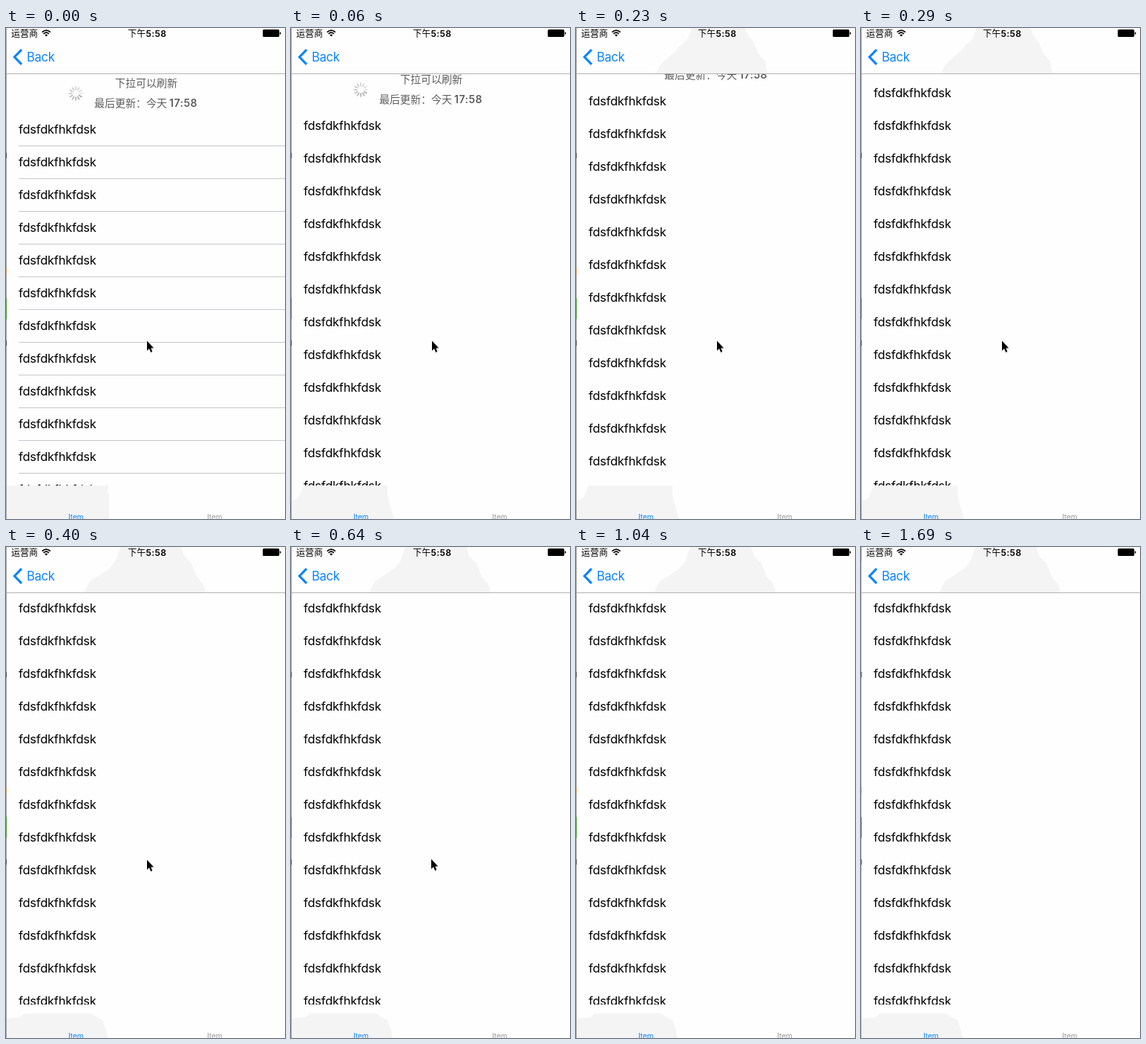
An HTML page for the animation above (1.74 s loop, 376x660 px).

```html
<!DOCTYPE html>
<html lang="zh">
<head>
<meta charset="utf-8">
<title>Pull to refresh</title>
<style>
html, body { margin: 0; width: 100%; height: 100%; overflow: hidden; background: #fefefe; }
svg { display: block; width: 376px; height: 660px; font-family: Inter, "Noto Sans CJK SC", "Noto Sans CJK", sans-serif; }
.row { font-size: 16.4px; letter-spacing: -.18px; }
.hint { font-size: 14px; font-weight: 500; fill: #5c5c5c; }
.num { font-weight: 600; letter-spacing: .5px; }
.status { font-size: 12px; }
.clock { font-weight: 600; letter-spacing: .45px; }
.nav { font-size: 16.6px; letter-spacing: -.3px; fill: #0b84ff; }
.tab { font-size: 10px; }
.shade path { fill: #f4f4f4; }
</style>
</head>
<body>
<svg viewBox="0 0 376 660">
  <defs><clipPath id="view"><path d="M0 62H376V615H0z"/></clipPath></defs>
  <rect width="376" height="660" fill="#fefefe"/>
  <g class="shade" id="shade"></g>

  <g clip-path="url(#view)">
    <g id="list">
      <g id="spinner" transform="translate(94 88)" stroke-width="1.7" stroke-linecap="round"></g>
      <text class="hint" x="147" y="79.3">下拉可以刷新</text>
      <text class="hint" x="119" y="106.3">最后更新：今天</text>
      <text class="hint num" x="220" y="106">17:58</text>
      <g id="rows"></g>
    </g>
    <g id="lines" fill="#c8c7cc"></g>
  </g>

  <path d="M0 61H376V62H0z" fill="#b4b4b4"/>
  <text class="status" x="7" y="11.6">运营商</text>
  <g fill="none" stroke="#000" stroke-width="1.7">
    <path d="M48.6 5.6Q54.2 .6 59.8 5.6M50.6 7.8Q54.2 4.5 57.8 7.8"/>
    <path d="M54.2 11.4L52.2 9.3Q54.2 7.8 56.2 9.3z" fill="#000" stroke="none"/>
  </g>
  <text class="status" x="164.3" y="11.6" font-weight="500">下午</text>
  <text class="status clock" x="188.4" y="11.5">5:58</text>
  <rect x="346" y="2" width="22.3" height="10" rx="1.6"/>
  <path d="M369 5.2Q370.6 5.6 370.6 7T369 8.8z"/>

  <path d="M21 29.2L11.4 39L21 48.8" fill="none" stroke="#0b84ff" stroke-width="3.1"/>
  <text class="nav" x="28" y="45">Back</text>
  <text class="tab" x="84" y="661" fill="#0b84ff">Item</text>
  <text class="tab" x="271" y="661" fill="#999">Item</text>

  <g id="edge">
    <path d="M0 0H1V660H0z" fill="#a6a6a6"/>
    <path d="M0 168H1V175H0zM0 420H1V427H0z" fill="#555"/>
    <path d="M0 323H1V331H0z" fill="#d69a60"/>
    <path d="M0 363H1V391H0z" fill="#4c9a35"/>
  </g>
  <path id="edgeLight" d="M0 19H1V168H0zM0 175H1V323H0zM0 331H1V363H0zM0 391H1V420H0zM0 427H1V660H0z" fill="#c6c6c6"/>

  <path id="cursor" d="M0 0V13.2L3 10.5L5.1 15.4L7.3 14.4L5.2 9.7H9.2z" fill="#000" stroke="#fff" stroke-width="1.6" paint-order="stroke"/>
</svg>
<script>
const LOOP = 1740;
const $ = id => document.getElementById(id);

function add(parent, tag, attrs, text = '') {
  const el = document.createElementNS('http://www.w3.org/2000/svg', tag);
  for (const k in attrs) el.setAttribute(k, attrs[k]);
  el.textContent = text;
  return parent.appendChild(el);
}

// steps: [time, value] pairs, each value held until the next time
function hold(el, prop, steps) {
  const frames = steps.map(([t, v]) => ({ offset: t / LOOP, [prop]: v, easing: 'steps(1, end)' }));
  frames.push({ offset: 1, [prop]: steps[steps.length - 1][1] });
  el.animate(frames, { duration: LOOP, iterations: Infinity });
}

const move = (x, y) => `translate(${x}px, ${y}px)`;
const show = (el, from, to) => hold(el, 'opacity',
  [...(from > 0 ? [[0, 0]] : []), [from, 1], ...(to < LOOP ? [[to, 0]] : [])]);

for (let i = 0; i < 13; i++) {
  add($('rows'), 'text', { class: 'row', x: 17, y: 142 + 44 * i }, 'fdsfdkfhkfdsk');
  if (i < 11) add($('lines'), 'rect', { x: 17, y: 158 + 44 * i, width: 359, height: 1 });
}

for (let i = 0; i < 12; i++) {
  const gray = 170 + ((i + 8) % 12) * 5;
  add($('spinner'), 'path', {
    d: 'M0 -5.2V-9', transform: `rotate(${i * 30})`, stroke: `rgb(${gray},${gray},${gray})`
  });
}

// scroll back under the bar
hold($('list'), 'transform', [
  [0, 0], [60, -5], [120, -14], [170, -25], [230, -38], [290, -49], [340, -53], [400, -54]
].map(([t, y]) => [t, move(0, y)]));
show($('lines'), 0, 60);

// pale patches on the bars
const wedge = 'M0 660V636L10 632L17 615H130V627L133 640L139 660z';
[
  [0, 60, 'M0 615H139L137 622L139 627V660H0z'],
  [60, 120, wedge],
  [120, 230, 'M0 615H128L127 625L131 631V660H0z'],
  [170, 230, 'M148 61L150 50L155 42L165 36L183 31L200 27L217 28L232 34L239 44L241 61z'],
  [230, 340, wedge],
  [230, 340, 'M107 61L115 48L130 35L142 22L150 15L156 0H228L232 10L240 20L246 35L255 45L258 61z'],
  [340, LOOP, 'M0 660V634L20 632L25 627H115L122 632L130 636L135 650L137 660z'],
  [340, LOOP, 'M105 61L113 46L126 38L140 28L148 18L154 0H236L240 12L250 22L257 40L266 50L269 61z']
].forEach(([from, to, d]) => show(add($('shade'), 'path', { d }), from, to));

// pointer speeds up towards the upper left, then leaves
const path = [[0, move(190, 420.5)]];
for (let i = 0; i < 7; i++) {
  const p = (i / 6) ** 1.7;
  path.push([640 + Math.round(i * 5.7) * 10, move(189 - 97 * p, 419.5 - 311.5 * p)]);
}
hold($('cursor'), 'transform', path);
show($('cursor'), 0, 1040);
show($('edgeLight'), 1690, LOOP);
</script>
</body>
</html>
```
